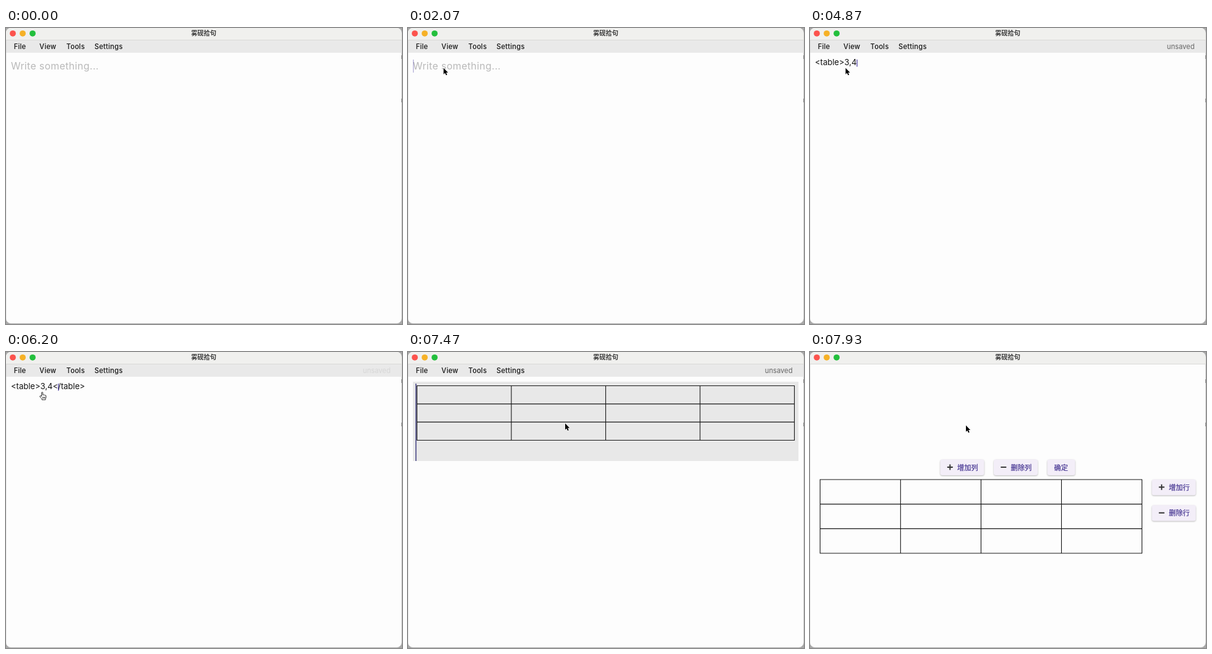
Write an HTML page that moves like this. It is 640 by 478 pixels and loops after 8 s.

```html
<!DOCTYPE html>
<html lang="zh">
<head>
<meta charset="utf-8">
<title>Table editing</title>
<style>
  html, body { margin: 0; height: 100%; overflow: hidden; background: #a8a8a8; }
  svg { display: block; font-family: Inter, "Noto Sans CJK SC", "Noto Sans CJK", sans-serif; }
  .title { font: bold 10.2px "Noto Sans CJK SC", "Noto Sans CJK", sans-serif; fill: #3c3c3c; text-anchor: middle; }
  .menu { font-size: 11.2px; font-weight: 500; letter-spacing: .22px; fill: #161616; }
  .button text { font: 500 11.2px "Noto Sans CJK SC", "Noto Sans CJK", sans-serif; fill: #4b3b95; stroke: #4b3b95; stroke-width: .25; }
  .button rect { fill: #f3eef8; filter: drop-shadow(0 1px .8px #0004); }
  .button path { stroke: #333; stroke-width: 1.9; }
  .grid { fill: none; stroke: #161616; stroke-width: 1.1; }
</style>
</head>
<body>
<svg width="640" height="478" viewBox="0 0 640 478">
  <clipPath id="frame"><rect width="639.4" height="477" rx="8"/></clipPath>
  <g clip-path="url(#frame)">
    <rect width="640" height="478" fill="#fdfdfd"/>
    <rect width="640" height="20" fill="#f0f0ee"/>
    <path d="M0 19.5H640" stroke="#d9d9d7"/>
    <circle cx="11" cy="8.8" r="4.9" fill="#fc534d"/>
    <circle cx="27" cy="8.8" r="4.9" fill="#f6b127"/>
    <circle cx="43" cy="8.8" r="4.9" fill="#23bf3d"/>
    <text class="title" x="319.5" y="12.3">雾砚拾句</text>

    <g id="editor">
      <rect y="20" width="640" height="20" fill="#e9e9e9"/>
      <g class="menu">
        <text x="12.7" y="34">File</text>
        <text x="54" y="34">View</text>
        <text x="97.5" y="34">Tools</text>
        <text x="143" y="34">Settings</text>
      </g>
      <text id="unsaved" x="621.5" y="34" font-size="11.2" text-anchor="end" fill="#666">unsaved</text>
      <text id="placeholder" x="8" y="66.5" font-size="15.8" letter-spacing=".36" fill="#b9b9b9">Write something...</text>
      <text id="typed" x="8" y="60" font-size="13" fill="#111"></text>
      <rect id="caret" y="51" width="1.3" fill="#5547a8"/>
      <g id="block">
        <rect x="8" y="48" width="623" height="128" fill="#e8e8e8"/>
        <path d="M12.8 51V176" stroke="#4c4a88" stroke-width="1.6"/>
      </g>
    </g>
    <g id="tools"></g>
    <path d="M.25 20V478" stroke="#ccc" stroke-width=".5"/>
  </g>
  <path d="M639.6 44v6M639.6 114v6" stroke="#555" stroke-width=".8"/>

  <path id="arrow" d="M0 0V10.2L2.3 8.1 4 11.8 5.8 11 4.1 7.4H7.2Z" stroke="#fff" stroke-width=".9" paint-order="stroke"/>
  <path id="hand" d="M0 7V1.4a1 1 0 0 1 2 0V5Q3 4 3.9 5.1 4.9 4.3 5.7 5.4 7.2 5 7.2 6.8V9L6.3 11V12.6H.5V11L-2.8 7.6Q-2.7 5.8-1.2 6.3ZM2 8v2.4M3.7 8v2.4M5.3 8v2.4" fill="#fff" stroke="#111" stroke-width=".9" stroke-linejoin="round"/>
</svg>
<script>
const LOOP = 8000, CLICK = 1330, RENDER = 6260, OPEN = 7535, SETTLE = 7770;
const TEXT = "<table>3,4</table>", CARET_MAX = 11;
const KEY_TIMES = [2270, 2600, 2800, 3000, 3270, 3470, 3730, 4070, 4400, 4800, 5300];
const COMPLETE = 5600, REEDIT = 6190;

const $ = id => document.getElementById(id);
const clamp = v => Math.min(1, Math.max(0, v));
const ramp = (t, start, end) => clamp((t - start) / (end - start));
const show = (id, opacity) => $(id).style.opacity = +opacity;

function grid(x, y, w, h) {
  let d = `M${x} ${y}h${w}v${h}h${-w}z`;
  for (const i of [1, 2]) d += `M${x} ${y + h * i / 3}h${w}`;
  for (const i of [1, 2, 3]) d += `M${x + w * i / 4} ${y}v${h}`;
  return `<path class="grid" d="${d}"/>`;
}

function button(x, y, w, label, icon) {
  const bars = { "+": "M-4.5 0h9M0-4.5v9", "-": "M-4.5 0h9" }[icon];
  return `<g class="button" transform="translate(${x} ${y})">
    <rect width="${w}" height="25.5" rx="3.5"/>
    ${bars ? `<path d="${bars}" transform="translate(15.8 12.5)"/>` : ""}
    <text x="${bars ? 27.5 : 11}" y="17.2">${label}</text></g>`;
}

$("block").innerHTML += grid(14.5, 54.5, 610, 88);
$("tools").innerHTML = grid(16.3, 150, 520.2, 119)
  + button(210.5, 117.5, 71, "增加列", "+")
  + button(297, 117.5, 71, "删除列", "-")
  + button(383.5, 117.5, 45, "确定")
  + button(552.5, 149.7, 71, "增加行", "+")
  + button(552.5, 191.3, 71, "删除行", "-");
const hoverRect = document.querySelector(".button rect");

// time, x, y
const POINTER = [
  [70, 341, 388], [270, 224, 221], [470, 224, 221], [1270, 57.5, 64.5],
  [6210, 57.5, 64.5], [6400, 200, 177], [6600, 200, 177], [7130, 254, 115.3],
  [7740, 254, 115.3], [7930, 252, 118.6], [LOOP, 252, 118.6]
];

function pointerAt(t) {
  const i = Math.max(1, POINTER.findIndex(p => p[0] > t));
  const [t0, x0, y0] = POINTER[i - 1], [t1, x1, y1] = POINTER[i];
  const k = ramp(t, t0, t1), e = k * k * (3 - 2 * k);
  return `translate(${x0 + (x1 - x0) * e} ${y0 + (y1 - y0) * e})`;
}

function drawEditor(t) {
  const keys = KEY_TIMES.filter(k => k <= t).length;
  $("typed").textContent = TEXT.slice(0, t >= COMPLETE ? TEXT.length : keys);
  show("placeholder", !keys);
  show("typed", t < RENDER);
  show("block", t >= RENDER);
  show("unsaved", ramp(t, 2250, 2500) - ramp(t, 5600, 5930) + ramp(t, 6170, 6390));

  const count = Math.min(keys, CARET_MAX);
  const caret = $("caret");
  caret.setAttribute("x", 8 + (count ? $("typed").getSubStringLength(0, count) : 0));
  caret.setAttribute("height", keys ? 11.5 : 21);
  const last = [CLICK, ...KEY_TIMES, COMPLETE, REEDIT].filter(k => k <= t).pop();
  const blink = clamp(.5 + 1.2 * Math.cos((t - last) * 2 * Math.PI / 1000));
  show("caret", t >= CLICK && t < RENDER ? blink : 0);
}

function drawTools(t) {
  $("tools").setAttribute("transform", `translate(0 ${t < SETTLE ? 0 : 56})`);
  const hovered = t >= OPEN + 30 && t < SETTLE;
  hoverRect.style.fill = hovered ? "#e5dfee" : "";
  hoverRect.style.filter = hovered ? "drop-shadow(0 1px 1.5px #0007)" : "";
}

function draw(now) {
  const t = now % LOOP;
  drawEditor(t);
  drawTools(t);
  show("editor", t < OPEN);
  show("tools", t >= OPEN);

  const pointing = t >= REEDIT && t < 6330;
  $("arrow").setAttribute("transform", pointerAt(t));
  $("hand").setAttribute("transform", pointerAt(t));
  show("arrow", t >= 70 && !pointing);
  show("hand", pointing);
  requestAnimationFrame(draw);
}
requestAnimationFrame(draw);
</script>
</body>
</html>
```
